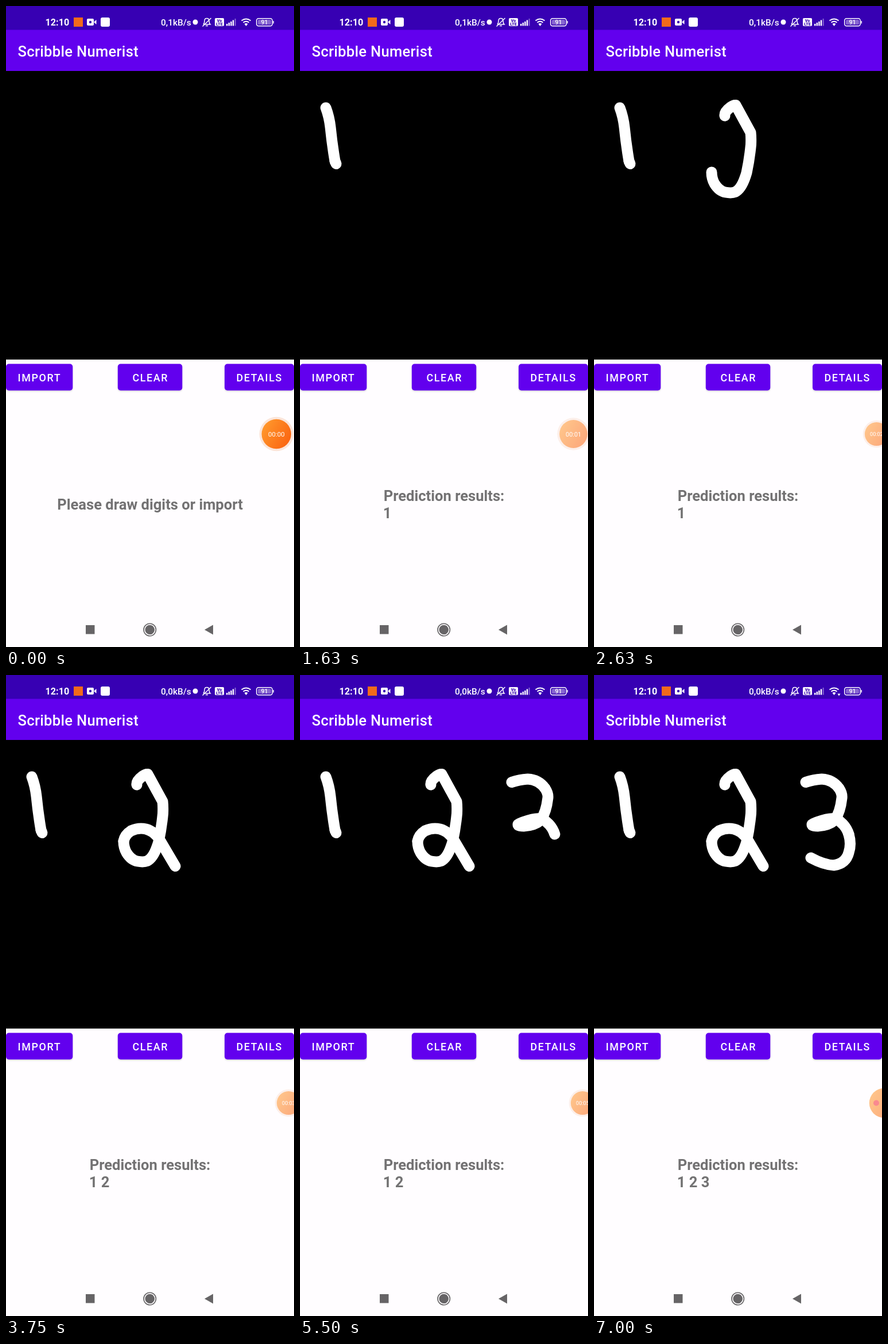
These frames come from a looping animation (502x1115 px, 8000 ms). An HTML page:

```html
<!DOCTYPE html>
<html lang="en">
<head>
<meta charset="utf-8">
<title>Handwritten digits</title>
<style>
  html, body { margin: 0; width: 100%; height: 100%; overflow: hidden; background: #fffdff; }
  svg { display: block; width: 502px; height: 1115px; font-family: Roboto, sans-serif; }
  .button { font-size: 17.9px; font-weight: 500; letter-spacing: 1.6px; fill: #fff; }
  .message { font-size: 25.57px; font-weight: 700; fill: #737273; }
</style>
</head>
<body>
<svg viewBox="0 0 502 1115">
  <defs>
    <linearGradient id="orange" x1="0" y1=".2" x2="1" y2=".8">
      <stop offset=".1" stop-color="#ff942a"/>
      <stop offset="1" stop-color="#fa6210"/>
    </linearGradient>
    <filter id="shadow" x="-10%" y="-20%" width="120%" height="150%">
      <feDropShadow dx="0" dy="1.5" stdDeviation="1.3" flood-opacity=".16"/>
    </filter>
  </defs>

  <rect width="502" height="1115" fill="#fffdff"/>
  <rect width="502" height="42" fill="#3700b3"/>
  <rect y="41.5" width="502" height="71.500" fill="#6200ee"/>
  <rect y="113" width="502" height="502" fill="#000"/>

  <!-- status bar -->
  <g fill="#fff">
    <text x="68.5" y="34" font-size="16.2" font-weight="700">12:10</text>
    <rect x="118" y="20" width="16" height="16" fill="#f26a1b"/>
    <rect x="141" y="22" width="12" height="12" rx="2"/>
    <path d="M153 28l4.500-4v8z"/>
    <circle cx="147" cy="28" r="2.200" fill="#3700b3"/>
    <rect x="165" y="20" width="16" height="16" rx="3"/>
    <text id="speed" x="270" y="34" font-size="15.4" font-weight="500"></text>
    <circle cx="330" cy="28" r="4.500"/>
    <g fill="none" stroke="#fff" stroke-width="1.500">
      <path d="M344 32h12q-2-2-2-6c0-6-8-6-8 0q0 4-2 6M348 34.500h4M342.500 35.500L357.500 21"/>
      <path d="M410.500 25.500q8-6 16 0M413.500 28.700q5-3.700 10 0" stroke-width="2"/>
      <rect x="436.700" y="21.700" width="27.500" height="13" rx="3.500"/>
    </g>
    <path d="M415.500 31q3-2 6 0l-3 4z"/>
    <rect x="364" y="21" width="16" height="14" rx="2"/>
    <g fill="#3700b3" font-size="7" font-weight="900" text-anchor="middle">
      <text x="372" y="27.700">Vo</text>
      <text x="372" y="34">LTE</text>
    </g>
    <path d="M384 31h2.400v3.500h-2.400zM387.600 29h2.400v5.500h-2.400zM391.200 27h2.400v7.500h-2.400zM394.800 24.500h2.400v10h-2.400z"/>
    <path d="M398.600 22h2v12.500h-2z" opacity=".4"/>
    <rect x="439" y="24" width="23" height="8.500" rx="1.500" opacity=".4"/>
    <path d="M465.500 26h1.500v4.500h-1.500z"/>
    <text x="450.500" y="32" font-size="10.500" font-weight="500" text-anchor="middle">91</text>
    <path id="upload" d="M424.500 30.500l2.500-4 2.500 4z"/>
    <path id="download" d="M424.500 32.500h5l-2.500 4z"/>
  </g>

  <text x="20.500" y="88" font-size="25.570" font-weight="500" letter-spacing=".3" fill="#fff">Scribble Numerist</text>

  <g id="ink" fill="none" stroke="#fff" stroke-width="19" stroke-linecap="round" stroke-linejoin="round"></g>

  <g fill="#6200ee" filter="url(#shadow)">
    <rect y="622.500" width="116.300" height="46.200" rx="5"/>
    <rect x="194.800" y="622.500" width="112.500" height="46.200" rx="5"/>
    <rect x="381" y="622.500" width="121" height="46.200" rx="5"/>
  </g>
  <g class="button">
    <text x="20.500" y="652.500">IMPORT</text>
    <text x="220.500" y="652.500">CLEAR</text>
    <text x="401.500" y="652.500">DETAILS</text>
  </g>

  <g class="message">
    <text id="hint" x="251" y="876" text-anchor="middle">Please draw digits or import</text>
    <g id="prediction">
      <text x="251" y="861" text-anchor="middle">Prediction results:</text>
      <text id="result" x="144.700" y="890.500"></text>
    </g>
  </g>

  <!-- floating recorder -->
  <g id="bubble">
    <circle id="halo" r="29.700" fill="#fbe5da"/>
    <circle r="25.700" fill="url(#orange)"/>
    <text id="timer" y="4.500" font-size="11.500" text-anchor="middle" fill="#fff"></text>
    <circle id="dot" cx="-13.500" r="5" fill="#f52c36"/>
  </g>

  <g fill="#666466">
    <rect x="139" y="1077" width="15.500" height="15.500"/>
    <circle cx="250.700" cy="1085" r="8.300"/>
    <circle cx="250.700" cy="1085" r="10.700" fill="none" stroke="#666466" stroke-width="1.600"/>
    <path d="M346 1085l15-8.500v17z"/>
  </g>
</svg>

<script>
const LOOP = 8000;
const $ = id => document.getElementById(id);
const clamp = v => Math.max(0, Math.min(1, v));
const mix = (a, b, p) => a + (b - a) * p;
const show = (id, on) => $(id).style.display = on ? '' : 'none';

// Pen strokes: first step, last step, path (one step lasts 125 ms)
const strokes = [
  [3, 5, 'M45 177Q51 193 53 211Q56 241 61 270'],
  [5, 6, 'M61 270L63 274.500'],
  [13, 21, 'M228 191Q227 184 238 176Q243 172 247 172.500L273 220Q274 228 273.500 241Q271 267 266 290Q258 318 246 323.500Q240 326 229 324Q218 322 210 309Q205 300 205 289'],
  [21, 25, 'M205 289Q207 278 218 271Q231 265 244 268Q259 272 268 287L295 332.500'],
  [34, 37, 'M369 186.500Q382 182 397 181Q416 182 427 197'],
  [37, 44, 'M427 197Q433 206 432 214Q429 240 419 253Q409 262 390 263Q380 263 380 260Q385 256 405 251Q422 247 430 256Q440 264 444 277'],
  [44, 47, 'M444 277Q449 294 444 309Q439 328 418 331Q400 330 378 318']
].map(([start, end, d]) => {
  const path = document.createElementNS('http://www.w3.org/2000/svg', 'path');
  path.setAttribute('d', d);
  path.setAttribute('pathLength', 1);
  $('ink').append(path);
  return { start, end, path };
});

function draw(time) {
  const step = Math.floor(Math.floor(time / 10) / 12.5);

  for (const { start, end, path } of strokes) {
    const p = clamp((step - start) / (end - start));
    path.style.display = p ? '' : 'none';
    path.setAttribute('stroke-dasharray', p < 1 ? `${p} 2` : 'none');
  }

  $('speed').textContent = step < 26 ? '0,1kB/s' : '0,0kB/s';
  show('upload', step >= 52 && step < 56);
  show('download', step >= 52);

  show('hint', step < 6);
  show('prediction', step >= 6);
  $('result').textContent = step < 26 ? '1' : step < 48 ? '1 2' : '1 2 3';

  // The recorder fades, docks at the edge, then swaps its clock for a dot
  const dock = clamp((step - 12) / 4), tuck = clamp((step - 44) / 2);
  const x = mix(mix(471.3, 492.5, dock), 505.5, tuck);
  const scale = mix(mix(1, .8, dock), 1, tuck);
  $('bubble').setAttribute('transform', `translate(${x} 744.5) scale(${scale})`);
  $('bubble').setAttribute('opacity', step < 12 ? 1 : .55);
  $('timer').textContent = '00:0' + Math.max(0, Math.floor((step - 1) / 8));
  show('timer', tuck === 0);
  show('halo', tuck < 1);
  show('dot', tuck === 1);
}

function tick() {
  draw(performance.now() % LOOP);
  requestAnimationFrame(tick);
}
tick();
</script>
</body>
</html>
```
